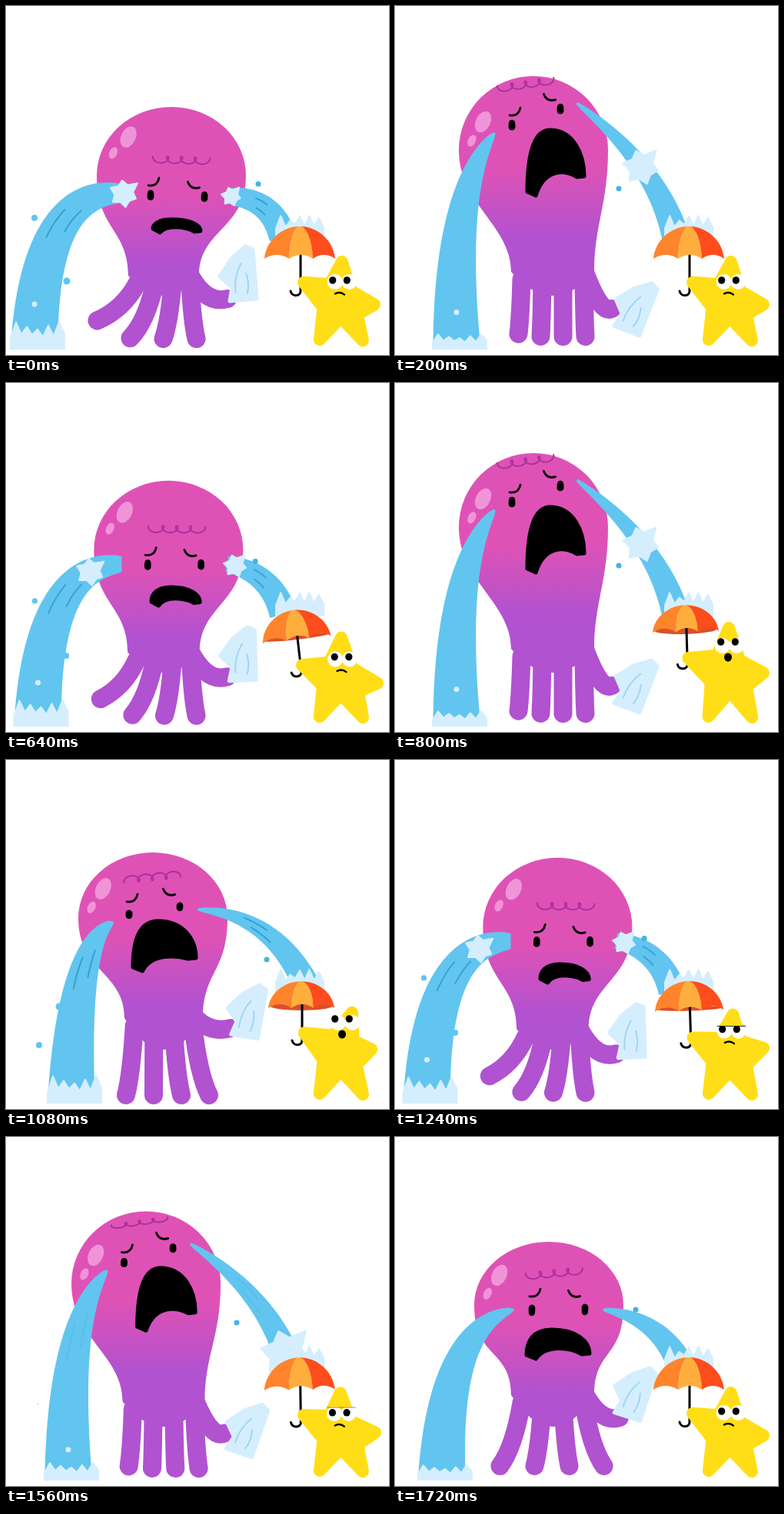
An HTML page with a canvas that plays this animation: 498 px wide and 453 px high, repeating every 1.76 s.

```html
<!DOCTYPE html>
<html lang="en">
<head>
<meta charset="utf-8">
<title>Crying octopus</title>
<style>
html, body { margin: 0; width: 100%; height: 100%; overflow: hidden; background: #fff; }
canvas { display: block; width: 498px; height: 453px; }
</style>
</head>
<body>
<canvas id="stage" width="498" height="453"></canvas>
<script>
const ctx = document.getElementById('stage').getContext('2d');
const LOOP = 1760, SOB = 600, STEP = 40;
const WATER = '#62c5ef', FOAM = '#d5eefd', RIPPLE = '#35a0d2', YELLOW = '#ffde17';
const HIP = 205, HEAD_RX = 97, EYE = 44;

// head: x, y, height; waist: y, half width; legs: tip x, y, gap, curl
// eyes: x, y, tilt; mouth: x, half width, top, left, right, middle
// streams: bend x, bend y, end x
const slumped = {
  head: [215, 220, 89], waist: [350, 46], legs: [183, 432, 43, 7], hand: [288, 380],
  leftEye: [188, 248, 0.21], rightEye: [258, 250, -0.13], sag: [-5],
  mouth: [222, 31, 277, 294, 292, 289], curl: [228, 200, 0.03, 1], shine: [0.73],
  leftTears: [45, 235, 37], rightTears: [345, 250, 360], source: [22],
  cloth: [303, 348, 0], drop: [328, 231], wet: [1]
};
const wailing = {
  head: [180, 187, 96], waist: [345, 54], legs: [204, 429, 29, 1], hand: [282, 393],
  leftEye: [152, 157, -0.36], rightEye: [215, 136, -0.46], sag: [-5],
  mouth: [209, 37, 161, 246, 221, 215], curl: [170, 102, -0.15, 1], shine: [0.51],
  leftTears: [72, 235, 80], rightTears: [340, 205, 365], source: [3],
  cloth: [311, 389, 0.45], drop: [291, 237], wet: [0]
};
const dropping = {
  head: [191, 205, 85], waist: [335, 51], legs: [210, 435, 36, 0], hand: [292, 348],
  leftEye: [160, 199, -0.55], rightEye: [226, 189, 0.23], sag: [3],
  mouth: [206, 41, 209, 274, 257, 256], curl: [190, 152, -0.1, -1], shine: [0.53],
  leftTears: [88, 235, 85], rightTears: [350, 200, 394], source: [3],
  cloth: [313, 325, 0.25], drop: [339, 259], wet: [1]
};
const landing = {
  head: [200, 218, 82], waist: [335, 54], legs: [204, 427, 45, 0], hand: [292, 364],
  leftEye: [178, 222, -0.1], rightEye: [247, 221, 0.14], sag: [6],
  mouth: [212, 41, 250, 288, 281, 275], curl: [207, 177, -0.1, 1], shine: [0.54],
  leftTears: [65, 245, 61], rightTears: [345, 235, 373], source: [3],
  cloth: [310, 330, 0.4], drop: [313, 224], wet: [0]
};

// umbrella: rim x, y, tilt, visible underside
const resting = {
  top: [437, 324], right: [487, 388], hand: [380, 355],
  eyes: [437, 358], look: [-3, -2], open: [0], lid: [0], umbrella: [382, 326, 0, 0]
};
const crouching = {
  top: [438, 335], right: [495, 405], hand: [381, 373],
  eyes: [440, 376], look: [0, -1], open: [0], lid: [0], umbrella: [378, 341, -0.2, 0]
};
const startled = {
  top: [434, 310], right: [487, 376], hand: [374, 354],
  eyes: [435, 341], look: [-2, -5], open: [1], lid: [0], umbrella: [378, 321, -0.03, 6]
};
const leaning = {
  top: [452, 320], right: [483, 374], hand: [381, 350],
  eyes: [441, 341], look: [-4, -5], open: [1], lid: [0], umbrella: [384, 320, 0, 6]
};
const fedUp = {
  top: [428, 325], right: [491, 370], hand: [380, 364],
  eyes: [434, 362], look: [-1, 1], open: [0], lid: [0.8], umbrella: [381, 327, -0.06, 0]
};

const lerp = (a, b, u) => a + (b - a) * u;
const linear = u => u, smooth = u => u * u * (3 - 2 * u), cubic = u => u ** 3;

const sobKeys = [[0, slumped, smooth], [200, wailing, cubic], [480, dropping, linear],
                 [520, landing, linear], [600, slumped]];
const starKeys = [[0, resting, linear], [280, resting, smooth], [480, crouching, smooth],
                  [800, startled, smooth], [1080, leaning, smooth], [1400, fedUp, smooth],
                  [1640, resting, linear], [LOOP, resting]];

function poseAt(keys, t) {
  const next = keys.findIndex(k => k[0] > t);
  const [t0, from, ease] = keys[next - 1], [t1, to] = keys[next];
  const u = ease((t - t0) / (t1 - t0));
  return Object.fromEntries(Object.keys(from).map(
    name => [name, from[name].map((v, i) => lerp(v, to[name][i], u))]));
}

function seeded(seed) {
  return () => (seed = seed * 16807 % 2147483647) / 2147483647;
}

function fill(color) {
  ctx.fillStyle = color;
  ctx.fill();
}

function stroke(color, width) {
  ctx.strokeStyle = color;
  ctx.lineWidth = width;
  ctx.stroke();
}

function trace(points) {
  ctx.beginPath();
  points.forEach(([x, y]) => ctx.lineTo(x, y));
  ctx.closePath();
}

function oval(x, y, rx, ry, color, turn = 0) {
  ctx.beginPath();
  ctx.ellipse(x, y, rx, ry, turn, 0, 7);
  fill(color);
}

function placed(x, y, turn, paint) {
  ctx.save();
  ctx.translate(x, y);
  ctx.rotate(turn);
  paint();
  ctx.restore();
}

// A bent line around its middle.
function bow(x, y, length, tilt, sag, width, color = '#000') {
  placed(x, y, tilt, () => {
    ctx.beginPath();
    ctx.moveTo(-length / 2, 0);
    ctx.quadraticCurveTo(0, 2 * sag, length / 2, 0);
    stroke(color, width);
  });
}

function limb(x, y, bendX, bendY, tipX, tipY, color) {
  ctx.beginPath();
  ctx.moveTo(x, y);
  ctx.quadraticCurveTo(bendX, bendY, tipX, tipY);
  stroke(color, 24);
}

function drawBody({ head: [x, y, ry], waist: [wy, half], legs, hand }) {
  const skin = ctx.createLinearGradient(0, y + 22, 0, y + 115);
  skin.addColorStop(0, '#df52b5');
  skin.addColorStop(1, '#b152d0');

  const [tipX, tipY, gap, curl] = legs;
  for (let i = 0; i < 4; i++) {
    const side = i - 1.5, rootX = HIP + side * half / 2, rootY = wy + 10;
    const endX = tipX + side * gap, endY = tipY - curl * Math.max(0, -side) ** 3;
    limb(rootX, rootY, lerp(rootX, endX, 0.35), lerp(rootY, endY, 0.7), endX, endY, skin);
  }
  limb(HIP + half - 14, wy - 5, HIP + half + 8, hand[1] + 8, ...hand, skin);

  const left = x - HEAD_RX, right = x + HEAD_RX;
  ctx.beginPath();
  ctx.moveTo(HIP - half, wy);
  ctx.bezierCurveTo(HIP - half, wy - 60, left, y + 70, left, y);
  ctx.ellipse(x, y, HEAD_RX, ry, 0, Math.PI, 2 * Math.PI);
  ctx.bezierCurveTo(right, y + 70, HIP + half, wy - 60, HIP + half, wy);
  ctx.quadraticCurveTo(HIP, 752 - wy, HIP - half, wy);
  fill(skin);
}

function drawCurl([x, y, tilt, flip]) {
  placed(x, y, tilt, () => {
    ctx.beginPath();
    for (let u = 0; u <= 1; u += 0.0125) {
      const a = u * Math.PI * 7.6 + 0.6;
      ctx.lineTo(68 * (u - 0.5) - 5 * Math.sin(a), -4.5 * flip * Math.cos(a));
    }
    stroke('#a9319f', 2);
  });
}

function drawMouth([x, w, top, left, right, middle]) {
  ctx.beginPath();
  ctx.moveTo(x - w, left - 5);
  ctx.bezierCurveTo(x - w, lerp(left, top, 0.6), x - w * 0.8, top, x - w * 0.2, top);
  ctx.bezierCurveTo(x + w * 0.6, top, x + w, lerp(right, top, 0.5), x + w, right);
  ctx.lineTo(x + w * 0.75, right + 1);
  ctx.bezierCurveTo(x + w * 0.4, middle - 2, x - w * 0.4, middle - 6, x - w * 0.7, left);
  ctx.closePath();
  fill('#000');
  stroke('#000', 5);
}

function drawFace({ head: [x, y], shine: [turn], curl, leftEye, rightEye, sag: [sag], mouth }) {
  const glint = (r, a, rx, ry) =>
    oval(x - r * Math.cos(a), y - r * Math.sin(a), rx, ry, '#f094d8', 0.45);
  glint(75, turn, 9.5, 14.5);
  glint(81, turn - 0.36, 5, 8);
  drawCurl(curl);
  bow(leftEye[0] + 4, leftEye[1] - 20, 17, -0.6, 4, 2.8);
  bow(rightEye[0] - 14, rightEye[1] - 18, 17, 0.45, 4, 2.8);
  bow(...leftEye, EYE, sag, 8.5);
  bow(...rightEye, EYE, sag, 8.5);
  drawMouth(mouth);
}

function drawCloth([x, y, tilt]) {
  placed(x, y, tilt, () => {
    trace([[8, -36], [18, -32], [23, 32], [-12, 35], [-9, 17], [-25, 3], [-10, -20]]);
    fill(FOAM);
    stroke(FOAM, 5);
    bow(-1, 5, 38, 1.75, 3, 2, '#9fd6f3');
    bow(10, 12, 26, 1.5, -2, 2, '#9fd6f3');
  });
}

// A stream starts at the outer end of an eye and widens as it falls.
function makeStream([x, y, tilt], [bendX, bendY, endX], side, source, endY, endWidth) {
  const reach = side * (EYE / 2);
  const x0 = x + reach * Math.cos(tilt) + side * source * 0.6, y0 = y + reach * Math.sin(tilt);
  const curve = (a, b, c, u) => lerp(lerp(a, b, u), lerp(b, c, u), u);
  return {
    end: endX,
    at(u, across = 0) {
      const dx = lerp(bendX - x0, endX - bendX, u), dy = lerp(bendY - y0, endY - bendY, u);
      const shift = across * lerp(source, endWidth, u ** 0.7) / 2 / Math.hypot(dx, dy);
      return [curve(x0, bendX, endX, u) - dy * shift, curve(y0, bendY, endY, u) + dx * shift];
    }
  };
}

function drawStream(stream, ripples) {
  const steps = Array.from({ length: 31 }, (_, i) => i / 30);
  trace([...steps.map(u => stream.at(u, 1)), ...steps.reverse().map(u => stream.at(u, -1))]);
  fill(WATER);
  ctx.globalAlpha = ripples;
  for (const across of [-0.35, 0.4]) {
    ctx.beginPath();
    for (let u = 0.36; u < 0.55; u += 0.03) ctx.lineTo(...stream.at(u + across * 0.1, across));
    stroke(RIPPLE, 2);
  }
  ctx.globalAlpha = 1;
}

function crown(x, base, width, height, seed) {
  const random = seeded(seed), points = [[x - width / 2, base]];
  for (let i = 0; i <= 10; i++) {
    const rise = i % 2 ? 0.6 + 0.4 * random() : 0.35 + 0.15 * random();
    points.push([x + width * (i / 10 - 0.5), base - height * rise]);
  }
  trace([...points, [x + width / 2, base]]);
  fill(FOAM);
  stroke(FOAM, 2);
}

function burst([x, y], radius, turn) {
  const random = seeded(77);
  trace(Array.from({ length: 12 }, (_, i) => {
    const a = turn + i * Math.PI / 6, r = radius * (i % 2 ? 0.6 : 0.85 + 0.3 * random());
    return [x + r * Math.cos(a), y + r * Math.sin(a)];
  }));
  fill(FOAM);
  stroke(FOAM, 2);
}

function drawTears(o, p) {
  const [wet] = o.wet;
  const left = makeStream(o.leftEye, o.leftTears, -1, o.source[0], 436, 61);
  const right = makeStream(o.rightEye, o.rightTears, 1, o.source[0], 300, 36);
  drawStream(left, wet);
  drawStream(right, wet);
  if (p < 180) burst(left.at(p / 180), 20, 0.4);
  if (p < 400) burst(right.at(p / 400), 14 + p * 0.06, 0.2);
  crown(left.end + 4, 445, 70, 22 + 18 * wet, 5);
  crown(382, 302, 62, 38, 11);

  const fall = Math.min(1, p / 480);
  oval(lerp(37, 43, fall), lerp(275, 370, fall), 4 * wet, 4 * wet, WATER);
  oval(lerp(79, 69, fall), lerp(357, 320, fall), 4.5 * wet, 4.5 * wet, WATER);
  oval(...o.drop, 3.5, 3.5, '#45b4e2');
  if (p < 400) oval(left.end, lerp(387, 412, fall), 3.5, 3.5, FOAM);
}

function drawUmbrella([x, y, tilt, under]) {
  const w = 46 - under * 0.5, h = 40 - under * 1.2;
  placed(x, y, tilt, () => {
    oval(0, -1, w - 2, under, '#d9512b');
    ctx.beginPath();
    ctx.moveTo(1, -4);
    ctx.lineTo(1, 44);
    ctx.bezierCurveTo(1, 51, -10, 52, -12, 44);
    stroke('#000', 3);

    const rim = [-w, -w * 0.3, w * 0.37, w];
    ['#ff842b', '#ffae3d', '#ff4c1c'].forEach((color, i) => {
      const a = rim[i], b = rim[i + 1];
      ctx.beginPath();
      ctx.moveTo(0, -h);
      ctx.bezierCurveTo(a * 0.5, -h, a * 0.95, -h * 0.55, a, 2);
      ctx.quadraticCurveTo((a + b) / 2, -8, b, 2);
      ctx.bezierCurveTo(b * 0.95, -h * 0.55, b * 0.5, -h, 0, -h);
      fill(color);
    });
  });
}

function drawStarBody(s) {
  const middle = [435, lerp(s.top[1], 441, 0.52)], round = 8;
  const tips = [s.top, s.right, [468, 441], [404, 440], s.hand].map(([x, y]) => {
    const inset = round / Math.hypot(x - middle[0], y - middle[1]);
    return [lerp(x, middle[0], inset), lerp(y, middle[1], inset)];
  });
  trace(tips.flatMap((tip, i) => {
    const next = tips[(i + 1) % 5];
    const pull = i === 2 ? 0.6 : 0.4;
    return [tip, tip.map((v, k) => lerp((v + next[k]) / 2, middle[k], pull))];
  }));
  fill(YELLOW);
  stroke(YELLOW, 2 * round);
}

function drawStarFace({ eyes: [x, y], look: [dx, dy], open: [open], lid: [lid] }) {
  for (const ex of [x - 9.3, x + 9.3]) {
    oval(ex, y, 10, 10, '#fff');
    oval(ex + dx, y + dy, 4.6, 4.8, '#000');
    const a = Math.asin(1 - lid);
    ctx.beginPath();
    ctx.arc(ex, y, 10.3, Math.PI + a, 2 * Math.PI - a);
    fill(YELLOW);
    if (lid > 0.1) bow(ex, y - 10 * (1 - lid), 18, 0, 0, 2 * lid);
  }
  if (open > 0.5) oval(x + dx, y + 15, 5, 5.5 * open, '#000');
  else bow(x + dx, y + 16, 12, 0.1, -2, 2.4);
}

function draw(t) {
  const p = t % SOB, o = poseAt(sobKeys, p), s = poseAt(starKeys, t);
  ctx.fillStyle = '#fff';
  ctx.fillRect(0, 0, 498, 453);
  drawBody(o);
  drawFace(o);
  drawCloth(o.cloth);
  drawTears(o, p);
  drawUmbrella(s.umbrella);
  drawStarBody(s);
  drawStarFace(s);
}

ctx.lineCap = ctx.lineJoin = 'round';
const start = performance.now();
function tick() {
  const t = (performance.now() - start) % LOOP;
  draw(Math.floor(t / STEP) * STEP);
  requestAnimationFrame(tick);
}
tick();
</script>
</body>
</html>
```
